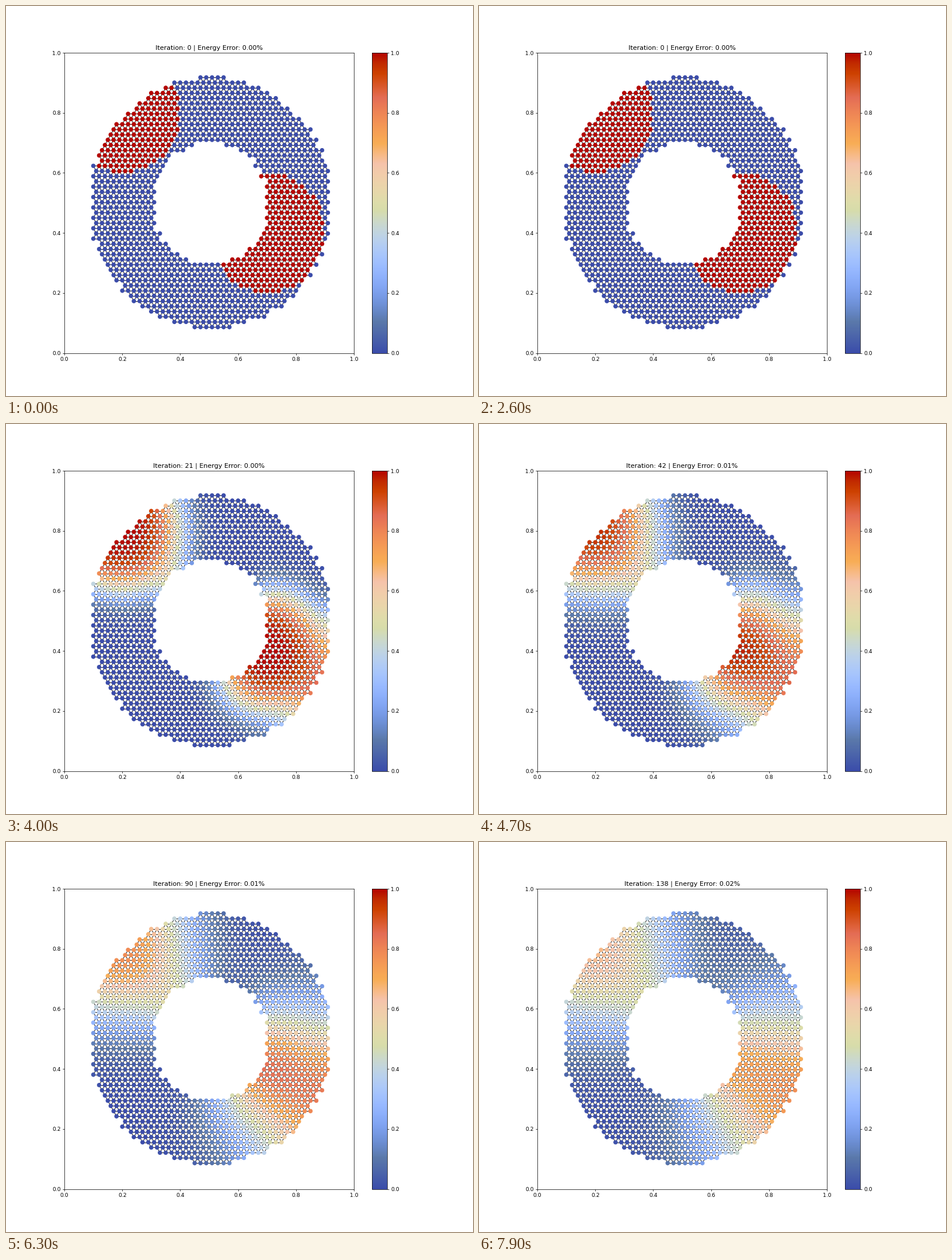
Animation, 800 px wide and 667 px high, one loop 8000 ms. Source, as a matplotlib script:

```python
import numpy as np
import matplotlib.pyplot as plt
from matplotlib.animation import FuncAnimation
from matplotlib.collections import LineCollection
from matplotlib.colors import ListedColormap

DPI = 200 / 3
FRAMES, INTERVAL = 80, 100
HOLD = 33            # frames before the heat starts to spread
STEPS = 3            # iterations per frame
RATE = 0.125         # share of the difference exchanged along each edge
DRIFT = 0.000128     # energy error in percent per iteration
H = 0.02             # lattice spacing


def ring_nodes():
    """Triangular lattice clipped to a ring; odd rows shift after clipping."""
    j, k = np.meshgrid(np.arange(51), np.arange(58))
    x, y = j * H, k * H * np.sqrt(3) / 2
    r = np.hypot(x - 0.5, y - 0.5)
    keep = (r >= 0.2) & (r <= 0.42)
    return (x + (k % 2) * H / 2)[keep], y[keep]


def ring_edges(x, y):
    dist = np.hypot(x[:, None] - x, y[:, None] - y)
    return np.nonzero(np.triu(dist < 1.05 * H, 1))


def disc(x, y, cx, cy, radius=0.2):
    return np.hypot(x - cx, y - cy) < radius


def simulate(u, a, b, count):
    states = [u]
    for _ in range(count):
        flow = RATE * (u[b] - u[a])
        u = (u + np.bincount(a, flow, len(u))
             - np.bincount(b, flow, len(u)))
        states.append(u)
    return states


def heat_map():
    """Coolwarm with the blue channel pulled down to four soft levels."""
    rgba = plt.get_cmap("coolwarm")(np.linspace(0, 1, 256))
    level = rgba[:, 2] * 3
    base = np.floor(level)
    ramp = np.clip((level - base - 0.68) / 0.32, 0, 1)
    rgba[:, 2] = np.clip((base + ramp) / 3, 0, 1)
    return ListedColormap(rgba)


x, y = ring_nodes()
a, b = ring_edges(x, y)
hot = disc(x, y, 0.2, 0.8) | disc(x, y, 0.7, 0.4)
states = simulate(hot.astype(float), a, b, STEPS * (FRAMES - HOLD))

plt.rcParams["font.family"] = "DejaVu Sans"
fig, ax = plt.subplots(figsize=(12, 10.0051), dpi=DPI)
pts = np.column_stack([x, y])
ax.add_collection(LineCollection(np.stack([pts[a], pts[b]], axis=1),
                                 colors="black", linewidths=1, zorder=1))
dots = ax.scatter(x, y, c=states[0], s=50, cmap=heat_map(),
                  vmin=0, vmax=1, zorder=2)
fig.colorbar(dots, ax=ax)
ax.set_xlim(0, 1)
ax.set_ylim(0, 1)
title = ax.set_title("")


def draw(frame):
    it = STEPS * max(0, frame - HOLD)
    dots.set_array(states[it])
    title.set_text(f"Iteration: {it} | Energy Error: {it * DRIFT:.2f}%")
    return dots, title


anim = FuncAnimation(fig, draw, frames=FRAMES, interval=INTERVAL,
                     repeat=True, repeat_delay=0, blit=False)
plt.show()
```
